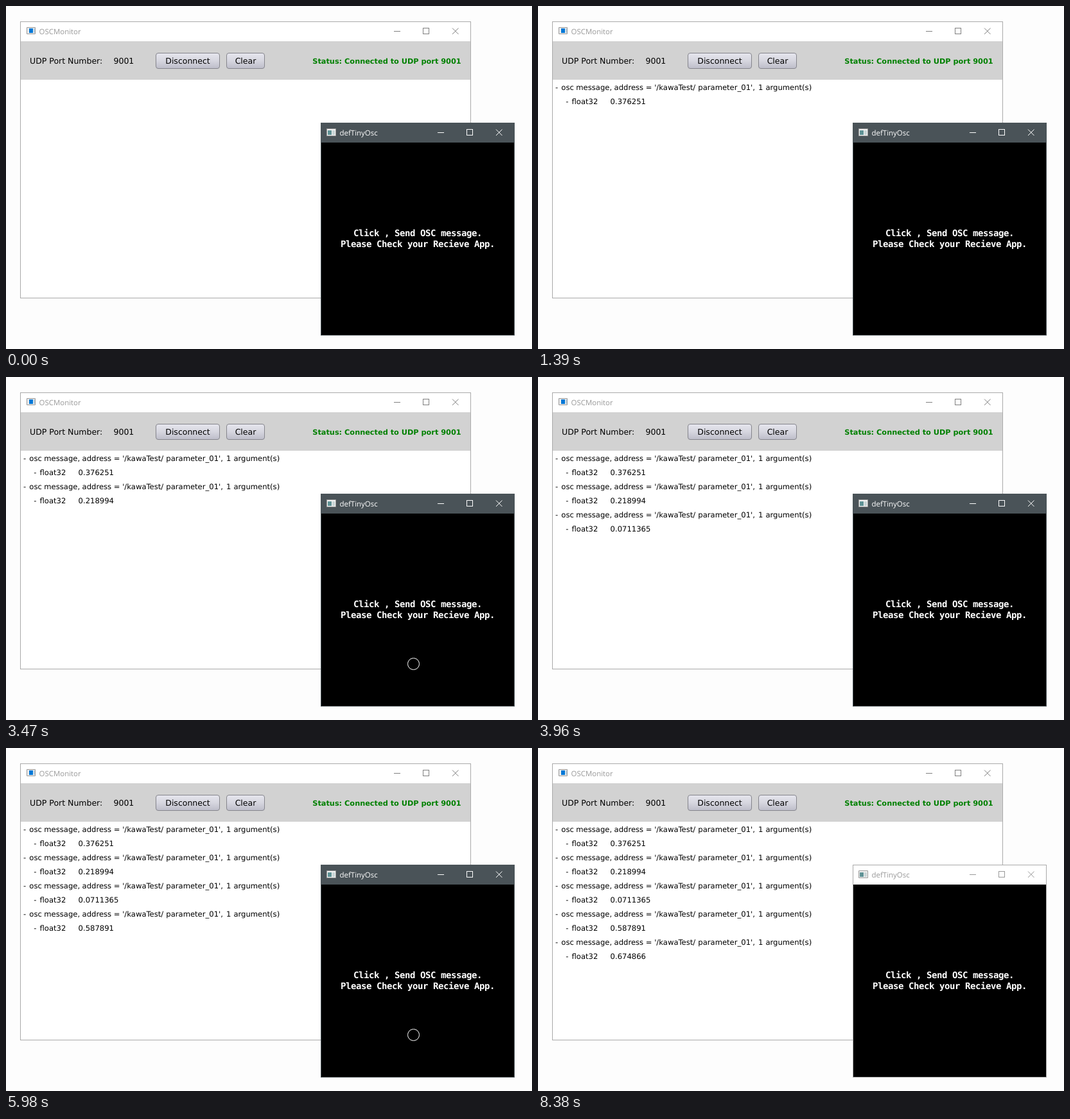
An HTML page that plays this animation: 819 by 535 pixels, repeating every 9060 ms.

```html
<!DOCTYPE html>
<html lang="en">
<head>
<meta charset="utf-8">
<title>OSC messages</title>
<style>
html, body { margin: 0; width: 100%; height: 100%; overflow: hidden; background: #fdfdfd; }
svg { display: block; width: 819px; height: 535px; }
text { font-family: "DejaVu Sans", sans-serif; font-size: 12.5px; text-rendering: geometricPrecision; white-space: pre; }
.title { font-family: "Open Sans", sans-serif; font-size: 11.45px; }
.log text { font-size: 11.6px; }
.mid { text-anchor: middle; }
.status { font-size: 11.3px; font-weight: bold; fill: #008000; }
.mono { font-family: "DejaVu Sans Mono", monospace; font-size: 14px; font-weight: bold; letter-spacing: -.428px; fill: #fff; }
.button { fill: url(#gloss); stroke: #85858c; }
.controls { fill: none; stroke: currentColor; }
#sender { color: #fff; --bar: #4a5358; --edge: #4a5358; }
#sender.idle { color: #999; --bar: #fff; --edge: #aaa; }
#sender .title { fill: currentColor; }
</style>
</head>
<body>
<svg viewBox="0 0 819 535">
  <defs>
    <linearGradient id="gloss" x2="0" y2="1">
      <stop offset="0" stop-color="#e6e6ee"/>
      <stop offset=".5" stop-color="#d6d6df"/>
      <stop offset="1" stop-color="#bdbdc9"/>
    </linearGradient>
    <g id="controls" class="controls">
      <path d="M0 5.5h10M45.5.5h9v9h-9z" shape-rendering="crispEdges"/>
      <path d="M91 .5l9.5 9.5M100.500 .5l-9.500 9.500"/>
    </g>
  </defs>

  <g id="monitor">
    <rect x="22.500" y="24.500" width="701" height="431" fill="#fff" stroke="#aaa"/>
    <path d="M32.500 33.500h13v10h-13z" fill="#eee" stroke="#999"/>
    <path d="M36 35h6v7h-6z" fill="#0078d7"/>
    <path d="M43 35h2v7h-2z" fill="#b5cfe6"/>
    <text class="title" x="51.500" y="44" fill="#999">OSCMonitor</text>
    <use href="#controls" x="604" y="34" color="#808080"/>
    <path d="M23 55h700v60H23z" fill="#d2d2d2"/>
    <text x="37" y="90">UDP Port Number:</text>
    <text x="167.500" y="90">9001</text>
    <rect class="button" x="233.500" y="73.500" width="99" height="24" rx="3.500"/>
    <text class="mid" x="283" y="90">Disconnect</text>
    <rect class="button" x="343.500" y="73.500" width="59" height="24" rx="3.500"/>
    <text class="mid" x="373" y="90">Clear</text>
    <text class="status" x="477.300" y="90">Status: Connected to UDP port 9001</text>
    <g class="log" id="log"></g>
  </g>

  <g id="sender">
    <rect x="490.500" y="182.500" width="301" height="331" fill="#000" style="stroke:var(--edge)"/>
    <path d="M491 183h300v30H491z" style="fill:var(--bar)"/>
    <path d="M499.500 191.500h14v11h-14z" fill="#f2f2f2" stroke="#999"/>
    <path d="M501 194h6v7h-6z" fill="#5f9295"/>
    <path d="M508 194h4v7h-4z" fill="#c9d5d6"/>
    <text class="title" x="519.500" y="202">defTinyOsc</text>
    <use href="#controls" x="672" y="192"/>
    <text class="mono" x="541" y="359">Click , Send OSC message.</text>
    <text class="mono" x="521" y="376">Please Check your Recieve App.</text>
    <circle id="pulse" cx="634.500" cy="447.500" r="9" fill="none" stroke="#fff"/>
  </g>
</svg>
<script>
const LOOP = 9060, IDLE_AT = 8380;
const clicks = [
  { down: 1120, logged: 1170, up: 1390, value: '0.376251' },
  { down: 2360, logged: 2360, up: 2660, value: '0.218994' },
  { down: 3470, logged: 3500, up: 3960, value: '0.0711365' },
  { down: 4770, logged: 4770, up: 5200, value: '0.587891' },
  { down: 5980, logged: 6010, up: 6340, value: '0.674866' }
];
const $ = id => document.getElementById(id);
const show = (el, on) => el.style.display = on ? '' : 'none';

// Each line is a list of [x, text] pieces
const line = (y, parts) => `<text y="${y}">` +
  parts.map(([x, s]) => `<tspan x="${x}">${s}</tspan>`).join(' ') + '</text>';
const header = [[27, '-'], [36.3, 'osc'], [59.3, 'message,'], [118.6, 'address'], [167.8, '='],
  [181.2, "'/kawaTest/"], [249.3, "parameter_01',"], [343, '1'], [354.4, 'argument(s)']];

$('log').innerHTML = clicks.map(({ value }, i) => {
  const y = 131 + 44 * i;
  return `<g>${line(y, header)}${line(y + 22, [[43.2, '-'], [52.5, 'float32'], [112.6, value]])}</g>`;
}).join('');
const entries = [...$('log').children];

function draw() {
  const t = performance.now() % LOOP;
  entries.forEach((el, i) => show(el, t >= clicks[i].logged));
  show($('pulse'), clicks.some(c => t >= c.down && t < c.up));
  $('sender').classList.toggle('idle', t >= IDLE_AT);
  requestAnimationFrame(draw);
}
draw();
</script>
</body>
</html>
```
